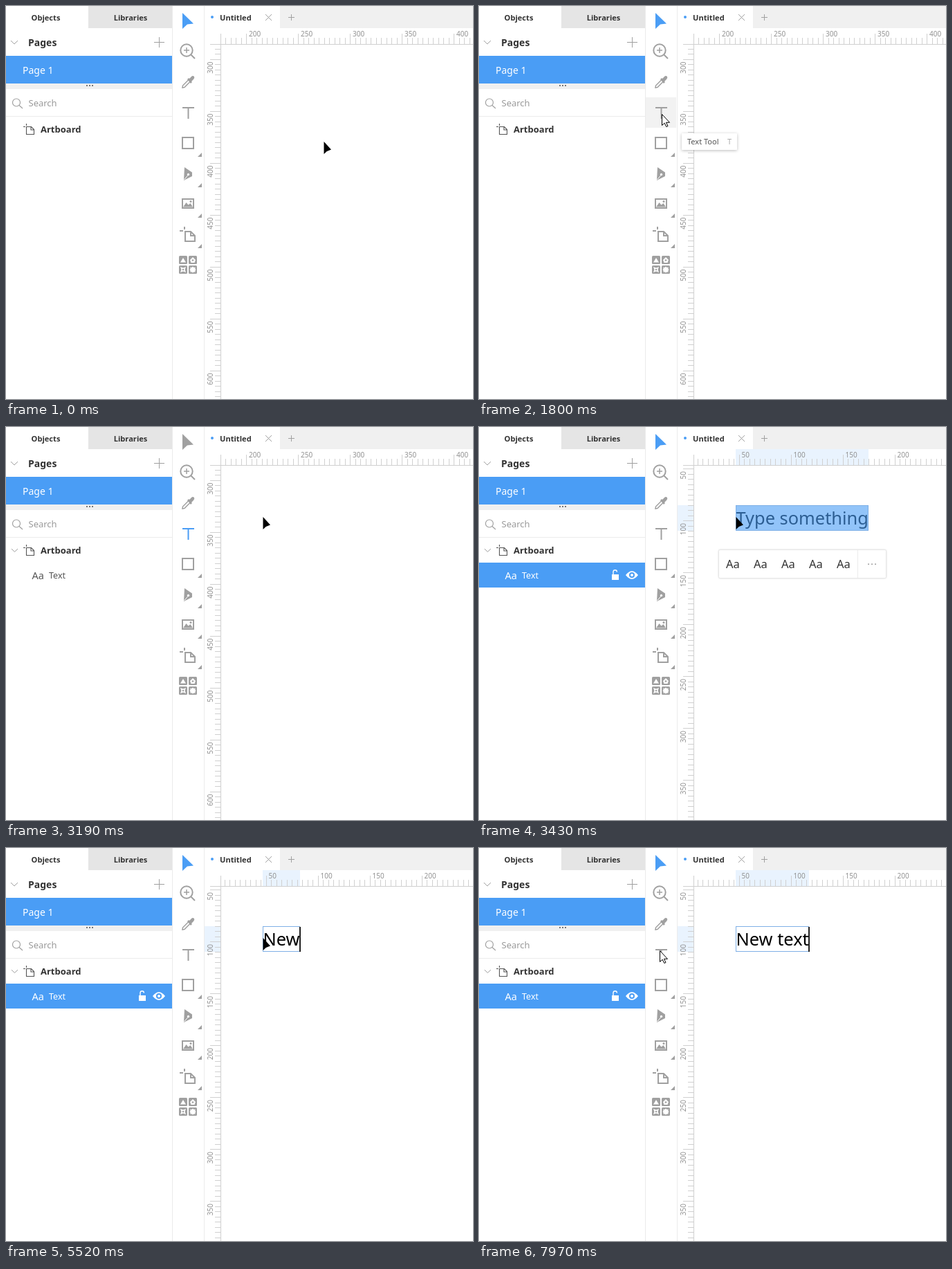
Write an HTML page that moves like this. It is 675 px wide and 568 px high and loops after 8000 ms.

```html
<!DOCTYPE html>
<html lang="en">
<head>
<meta charset="utf-8">
<title>Text tool</title>
<style>
  html, body { margin: 0; width: 100%; height: 100%; overflow: hidden; background: #fff; }
  svg { display: block; }
  text { font-family: "Noto Sans", "Open Sans", sans-serif; white-space: pre; fill: #333; }
  .semi { font-weight: 600; }
  .blue { fill: #4a9df5; }
  .line { fill: none; stroke: #a0a0a0; }
  .solid { fill: #a0a0a0; }
  .edge { fill: none; stroke: #ebebeb; }
  .ticks { fill: none; stroke: #d0d0d0; }
  .num { font-size: 10px; fill: #929292; }
  .mark { fill: none; stroke: #4a9df5; }
  .band { fill: #e9f3fe; }
  .tip { filter: drop-shadow(0 1px 2px #0004); }
  .pop { filter: drop-shadow(0 0 1px #0002); }
  #field { font-size: 25.4px; fill: #000; }
  #select { fill: #4a9df5; }
  #select.off { fill: #a0a0a0; }
  #textTool { stroke: #a0a0a0; }
  #textTool.on { stroke: #4a9df5; }
  #row { fill: #555; stroke: #555; }
  #row.on { fill: #fff; stroke: #fff; }
  #row text { fill: inherit; stroke: none; }
</style>
</head>
<body>
<svg width="675" height="568" viewBox="0 0 675 568">
  <!-- objects panel -->
  <path d="M119 0H240V32H119Z" fill="#e5e5e5"/>
  <path class="edge" d="M240.5 0V568M286.5 0V568M0 159.5H240"/>
  <g class="semi" font-size="11.1">
    <text x="57.5" y="21" text-anchor="middle">Objects</text>
    <text x="180" y="21" text-anchor="middle">Libraries</text>
  </g>
  <path class="line" d="M7 50L12 55L17 50"/>
  <text class="semi" x="32" y="58" font-size="14">Pages</text>
  <path class="line" d="M214 52.5H229M221.5 45V60"/>
  <path class="blue" d="M0 72H240V112H0Z"/>
  <text x="24" y="98" font-size="14" style="fill:#fff">Page 1</text>
  <path d="M0 112H240V120H0Z" fill="#f0f0f0"/>
  <path d="M116 114h2v2h-2zm4 0h2v2h-2zm4 0h2v2h-2z" fill="#777"/>
  <g class="line" stroke-width="1.2">
    <circle cx="15" cy="139.5" r="5.5"/><path d="M19 143.5L24 148"/>
  </g>
  <text x="32.5" y="145" font-size="13" style="fill:#999">Search</text>
  <path id="chevron" class="line" d="M8 176L12.5 180.5L17 176"/>
  <path fill="none" stroke="#555" stroke-width="1.1" d="M29.5 174.5V185.5H40.5V178.5L36.5 174.5ZM36 174.5V179H40.5M25 174.5H28M29.5 170V173"/>
  <text class="semi" x="50" y="183" font-size="13">Artboard</text>

  <path id="rowFill" class="blue" d="M0 196H240V232H0Z"/>
  <g id="row">
    <text x="37.5" y="220" font-size="14.5" font-weight="300">Aa</text>
    <text x="62" y="219" font-size="12.5">Text</text>
    <g id="rowIcons">
      <path stroke="none" d="M192 213h10v8h-10z"/>
      <path fill="none" stroke-width="1.4" d="M194 213V209.5a2.7 2.7 0 0 1 5.4 0"/>
      <path stroke="none" d="M212 214Q221 202.5 230 214Q221 225.5 212 214Z"/>
      <circle class="blue" stroke="none" cx="221" cy="214" r="4"/>
      <circle stroke="none" cx="221" cy="214" r="2"/>
    </g>
  </g>

  <!-- toolbar -->
  <path id="hover" d="M241 132H285V176H241Z" fill="#f2f2f2"/>
  <path id="select" d="M255 10L271 25.5L262 26.5L255 33Z"/>
  <g class="line" stroke-width="2">
    <circle cx="261" cy="64" r="8.7"/><path d="M267.5 70.5L273 76"/>
    <path stroke-width="1.5" d="M257 64H265M261 60V68"/>
    <path d="M255 190H271V206H255Z"/>
    <path d="M255 279H271V292H255Z"/>
    <path d="M259 326H267L273 332V340H259ZM267 326V332H273M251 325H256M258 319V323"/>
  </g>
  <g class="solid">
    <path d="M262 106L264 104L265 105L268 102Q270 100 272 102Q273 104 271 106L268 109L269 110L267 112Z"/>
    <path class="line" fill="none" stroke-width="1.5" d="M263.5 107L255.5 115L255 118L258 117.5L266 109.5"/>
    <path d="M258 233L269 240.5V246L257 252Z"/>
    <path fill="none" stroke="#fff" d="M257.5 251L263 244.5"/>
    <circle fill="#fff" cx="263.5" cy="243.5" r="1.7"/>
    <path d="M256 290.5L260.5 284L263.5 287.5L266.5 285L270 290.5Z"/>
    <circle cx="267" cy="282.5" r="1.5"/>
    <path d="M283 212v6h-6zM283 256v6h-6zM283 300v6h-6zM283 344v6h-6z"/>
    <g>
      <rect x="250" y="361" width="12" height="12" rx="1.5"/>
      <rect x="264" y="361" width="12" height="12" rx="1.5"/>
      <rect x="250" y="375" width="12" height="12" rx="1.5"/>
      <rect x="264" y="375" width="12" height="12" rx="1.5"/>
    </g>
    <path fill="#fff" d="M256 364L260 370.5H252Z"/>
    <path fill="#fff" d="M270 363L274 367L272.5 371H267.5L266 367Z"/>
    <path fill="#fff" d="M252 377L256 378.5L260 377L258.5 381L260 385L256 383.5L252 385L253.5 381Z"/>
    <path fill="#fff" d="M270 376.5L271.5 378L273.5 377.5V380L274.5 381L273.5 382.5V384.5H271.5L270 385.5L268.5 384.5H266.5V382.5L265.5 381L266.5 380V377.5L268.5 378Z"/>
    <circle cx="256" cy="381" r="1.2"/><circle cx="270" cy="367.5" r="1.3"/>
  </g>
  <path id="textTool" fill="none" stroke-width="2" d="M255 147H272M263.5 147V163"/>

  <!-- document tabs -->
  <path d="M396 0H675V32H396Z" fill="#f0f0f0"/>
  <circle class="blue" cx="298" cy="16" r="2"/>
  <text class="semi" x="309" y="21" font-size="11.1">Untitled</text>
  <path class="line" d="M375 12L384 21M384 12L375 21M408 16.5H417M412.5 12V21"/>

  <!-- canvas -->
  <g id="bands">
    <rect id="topBand" class="band" x="371" y="32" height="23"/>
    <path class="band" d="M287 113H310V150H287Z"/>
  </g>
  <g id="rulerBefore"></g>
  <g id="rulerAfter"></g>
  <path class="ticks" d="M295 55.5H675M310.5 40V568"/>
  <path id="markX" class="mark" d="M.5 32V56" stroke-width="1.5"/>
  <path id="markY" class="mark" d="M287 .5H311" stroke-width="1.2"/>

  <g id="editor">
    <text id="field" x="371.5" y="141"></text>
    <rect id="frame" x="371.5" y="113.5" height="36" stroke="#7fb0e6"/>
    <path id="caret" d="M-1 114H1V150H-1Z" fill="#222"/>
  </g>
  <g id="popup">
    <rect class="pop" x="346.5" y="177.5" width="242" height="41" rx="2" fill="#fff" stroke="#e6e6e6"/>
    <path class="edge" d="M547.5 178V218"/>
    <path class="solid" d="M562 197.5h2v1.5h-2zm5 0h2v1.5h-2zm5 0h2v1.5h-2z"/>
    <g id="styles"></g>
  </g>
  <g id="tooltip">
    <rect class="tip" x="293" y="184" width="80" height="24" rx="1" fill="#fff"/>
    <text x="301" y="200" font-size="11" style="fill:#555">Text Tool</text>
    <text x="359" y="200" font-size="11" style="fill:#aaa">T</text>
  </g>

  <!-- pointers, hot spot at the origin -->
  <path id="arrow" d="M.5 0V18L4.8 14L11 11.5Z"/>
  <path id="pointer" d="M.5 .5V16.5L4.2 13.2L6.8 18.5L9 17.5L6.5 12.3H11.5Z" fill="#fff" stroke="#000"/>
  <g id="cross" fill="none" stroke="#000">
    <path d="M-4 .5H5M.5 -4V5" stroke-width="1.5"/>
    <path d="M5.5 7V4.5H13.5V7M9.5 4.5V12.5M7.5 12.5H11.5" stroke-width="1.2"/>
  </g>
</svg>
<script>
const LOOP = 8000, UNIT = 1.5;
const $ = id => document.getElementById(id);
const show = (id, on) => { $(id).style.display = on ? '' : 'none'; };
const place = (id, x, y) => $(id).setAttribute('transform', `translate(${x} ${y})`);
const snap = v => Math.floor(v) + 0.5;

// zeroX and zeroY are the stage positions of the ruler origins.
function buildRuler(id, zeroX, zeroY) {
  let ticks = '', labels = '';
  for (let n = -100; n <= 700; n += 5) {
    const x = zeroX + n * UNIT, y = zeroY + n * UNIT, major = n % 50 === 0;
    if (x >= 310 && x < 675) {
      ticks += `M${snap(x)} ${major ? 40 : 46}V55`;
      if (major && n) labels += `<text class="num" x="${x + 3.5}" y="44">${n}</text>`;
    }
    if (y >= 55 && y < 568) {
      ticks += `M${major ? 295 : 302} ${snap(y)}H310`;
      if (major) labels += `<text class="num" text-anchor="end" transform="translate(299 ${y + 3.5}) rotate(-90)">${n}</text>`;
    }
  }
  $(id).innerHTML = `<path class="ticks" d="${ticks}"/>${labels}`;
}
buildRuler('rulerBefore', 47.5, -373);
buildRuler('rulerAfter', 301, -14.5);
$('styles').innerHTML = [0, 1, 2, 3, 4]
  .map(i => `<text x="${357 + 40 * i}" y="203.5" font-size="16.5">Aa</text>`).join('');

// Each move starts and ends at the given times and lands in equal time steps.
const moves = [
  { start: 540, end: 1310, steps: 11, to: [272, 159], ease: p => p * p * (3 - 2 * p) },
  { start: 1390, end: 1460, steps: 2, to: [264, 156], ease: p => p },
  { start: 2190, end: 2590, steps: 6, to: [370, 133], ease: p => 1 - (1 - p) ** 2 },
  { start: 3130, end: 3130, steps: 1, to: [371, 130], ease: p => p },
  { start: 7810, end: 7970, steps: 3, to: [261, 148], ease: p => p }
];
function cursorAt(t) {
  let pos = [459, 196];
  for (const { start, end, steps, to, ease } of moves) {
    if (t < start) break;
    const gap = (end - start) / (steps - 1) || 1;
    const p = ease(Math.min(1, (Math.floor((t - start) / gap + 0.01) + 1) / steps));
    pos = pos.map((v, i) => Math.round(v + (to[i] - v) * p));
  }
  return pos;
}

const keyTimes = [5060, 5370, 5520, 5690, 6080, 6240, 6410, 6780];
const contentAt = t => t < keyTimes[0] ? 'Type something'
  : 'New text'.slice(0, keyTimes.filter(k => t >= k).length);

function tooltipAt(t) {
  if (t < 1650 || t >= 1960) return 0;
  if (t < 1720) return 0.33;
  if (t < 1800) return 0.67;
  return t < 1880 ? 1 : 0.5;
}

let content = null;
function setContent(value) {
  if (value === content) return;
  content = value;
  $('field').textContent = value;
  const width = Math.round($('field').getComputedTextLength());
  $('topBand').setAttribute('width', width + 1);
  $('frame').setAttribute('width', width);
  place('caret', 372 + width, 0);
}

function render(t) {
  const [x, y] = cursorAt(t);
  const placed = t >= 3360, typing = t >= keyTimes[0];
  const textActive = t >= 1880 && !placed;
  const overTools = x < 286;
  const drawing = textActive && !overTools && t < 3130;

  show('hover', overTools && t < 2190);
  $('select').classList.toggle('off', textActive);
  $('textTool').classList.toggle('on', textActive);
  $('tooltip').style.opacity = tooltipAt(t);

  show('chevron', t >= 3130);
  show('row', t >= 3130);
  show('rowFill', placed);
  show('rowIcons', placed);
  $('row').classList.toggle('on', placed);

  show('rulerBefore', !placed);
  show('rulerAfter', placed);
  show('bands', placed);
  show('editor', placed);
  show('popup', t >= 3430 && t < 5140);
  if (placed) setContent(contentAt(t));
  $('frame').setAttribute('fill', typing ? 'none' : 'rgba(74,157,245,.6)');
  show('caret', typing && !(t >= 7490 && t < 7890));

  // The ruler marker trails the pointer until it rests.
  show('markX', drawing && x > 312);
  show('markY', drawing);
  place('markX', t < 2650 ? x - 3 : x, 0);
  place('markY', 0, y - 0.5);

  show('arrow', !overTools && !drawing);
  show('pointer', overTools);
  show('cross', drawing);
  for (const id of ['arrow', 'pointer', 'cross']) place(id, x, y);
}

const began = performance.now();
function tick() {
  render((performance.now() - began) % LOOP);
  requestAnimationFrame(tick);
}
tick();
</script>
</body>
</html>
```
